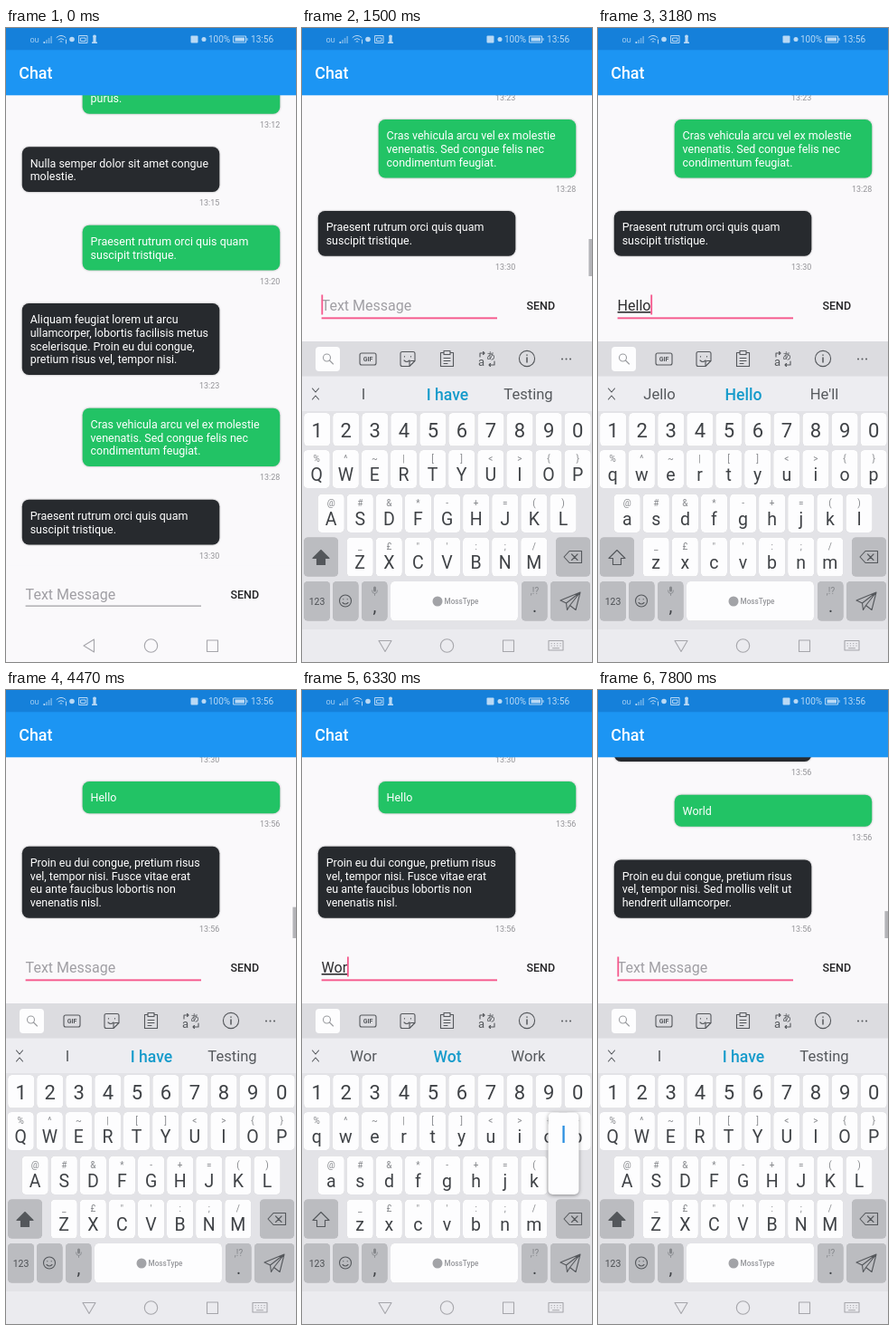
Recreate the animation shown at these times as an HTML page. Size 321 by 700 pixels, loop 8000 ms.

```html
<!DOCTYPE html>
<html lang="en">
<head>
<meta charset="utf-8">
<title>Chat</title>
<style>
html, body { margin: 0; width: 100%; height: 100%; overflow: hidden; background: #faf9fb; }
svg { display: block; width: 321px; height: 700px; font-family: Roboto, "Noto Sans", sans-serif; }
.line { fill: none; stroke: #54575b; stroke-width: 1.1; stroke-linecap: round; stroke-linejoin: round; }
.mid { text-anchor: middle; }
.bubble rect { filter: drop-shadow(0 .7px .9px #0005); }
.bubble text { font-size: 12.48px; fill: #fff; }
.bubble .time { font-size: 8.92px; fill: #929296; text-anchor: end; }
.key { fill: #fdfdfe; filter: drop-shadow(0 .6px .4px #0003); }
.special { fill: #bbbcc0; }
.letter { font-size: 19.5px; fill: #3f4246; }
.symbol { font-size: 10px; fill: #85878b; }
.status { fill: #b9d9f5; }
.status .line { stroke: #b9d9f5; stroke-width: 1; }
.nav .line { stroke: #a6a6ab; }
</style>
</head>
<body>
<script>
(() => {
const LOOP = 8000, PINK = '#f5588c';
const LIFT = 318.6;                       // how far the keyboard raises the input row
const LINE = 14.63, GAP = 36.6, VIEW = 199;
const FOCUS = 630, RESIZE = 840, HOLD = 70;
const SENDS = [3970, 7600];

const MESSAGES = [
  [1, '13:12', '', '', 'purus.'],
  [0, '13:15', 'Nulla semper dolor sit amet congue', 'molestie.'],
  [1, '13:20', 'Praesent rutrum orci quis quam', 'suscipit tristique.'],
  [0, '13:23', 'Aliquam feugiat lorem ut arcu', 'ullamcorper, lobortis facilisis metus',
    'scelerisque. Proin eu dui congue,', 'pretium risus vel, tempor nisi.'],
  [1, '13:28', 'Cras vehicula arcu vel ex molestie', 'venenatis. Sed congue felis nec', 'condimentum feugiat.'],
  [0, '13:30', 'Praesent rutrum orci quis quam', 'suscipit tristique.'],
  [1, '13:56', 'Hello'],
  [0, '13:56', 'Proin eu dui congue, pretium risus', 'vel, tempor nisi. Fusce vitae erat',
    'eu ante faucibus lobortis non', 'venenatis nisl.'],
  [1, '13:56', 'World'],
  [0, '13:56', 'Proin eu dui congue, pretium risus', 'vel, tempor nisi. Sed mollis velit ut', 'hendrerit ullamcorper.']
];

const PRESSES = [
  [1890, 'H'], [2400, 'e'], [2580, 'l'], [2730, 'l'], [2860, 'o'],
  [4920, 'W'], [5700, 'o'], [5960, 'r'], [6330, 'l'], [6780, 'd']
];

const GUESSES = {
  '': 'I,I have,Testing',
  H: 'He,Hi,How', He: "He's,He,Hey", Hel: 'Hel,Help,Held', Hell: "Hello,Hell,He'll", Hello: "Jello,Hello,He'll",
  W: 'We,What,Will', Wo: 'Wo,Would,Work', Wor: 'Wor,Wot,Work', Worl: 'Worl,World,Worlds', World: 'Worlds,World,Would'
};

const clamp = v => Math.max(0, Math.min(1, v));
const ramp = (t, a, b) => clamp((t - a) / (b - a));
const ease = p => 1 - (1 - p) ** 3;

function el(tag, attrs, parent, text) {
  const node = document.createElementNS('http://www.w3.org/2000/svg', tag);
  for (const k in attrs) node.setAttribute(k, attrs[k]);
  if (text !== undefined) node.textContent = text;
  if (parent) parent.append(node);
  return node;
}
const rect = (p, x, y, width, height, fill, rx = 0, more = {}) =>
  el('rect', { x, y, width, height, fill, rx, ...more }, p);
const label = (p, x, y, text, attrs = {}) => el('text', { x, y, ...attrs }, p, text);
const stroke = (p, d, attrs = {}) => el('path', { d, class: 'line', ...attrs }, p);
const ring = (p, cx, cy, r) => el('circle', { cx, cy, r, class: 'line' }, p);
const dot = (p, cx, cy, r, fill) => el('circle', { cx, cy, r, fill }, p);
const shift = (node, y) => node.setAttribute('transform', `translate(0 ${y})`);
const show = (node, on) => node.setAttribute('visibility', on ? 'visible' : 'hidden');

const svg = el('svg', { viewBox: '0 0 321 700' }, document.body);
rect(svg, 0, 0, 321, 700, '#faf9fb');

// Message list
const list = el('g', {}, svg);
const bubbles = [];
let nextY = 94.7 - 20.5 - 3 * LINE;
for (const [mine, time, ...lines] of MESSAGES) {
  const x = mine ? 84.7 : 17.8, y = nextY, h = 20.5 + LINE * lines.length;
  const g = el('g', { class: 'bubble' }, list);
  rect(g, x, y, 218.5, h, mine ? '#22c365' : '#272a2e', 7.5);
  lines.forEach((s, i) => label(g, x + 8.9, y + 22.3 + i * LINE, s));
  label(g, x + 218.5, y + h + 15.3, time, { class: 'time' });
  bubbles.push({ g, step: h + GAP });
  nextY += h + GAP;
}
const GROWTH = [bubbles[6].step + bubbles[7].step, bubbles[8].step + bubbles[9].step];

// Input row
const row = el('g', {}, svg);
rect(row, 0, 274.5, 321, 430, '#faf9fb');
const hint = label(row, 21.6, 312, 'Text Message', { 'font-size': 16.05, fill: '#a09fa4' });
const typed = label(row, 21.6, 312, '', { 'font-size': 16.05, fill: '#2c2c2e', 'text-decoration': 'underline' });
const rule = rect(row, 21.6, 319, 194.4, 1, '#8b8b8f');
const focusRule = rect(row, 21.6, 319.4, 194.4, 1.9, PINK);
const caret = rect(row, 21.4, 294.5, 1.8, 22, PINK);
label(row, 248.5, 311, 'SEND', { 'font-size': 12.48, 'font-weight': 500, fill: '#242426' });
const thumb = rect(svg, 317.4, 233, 3.6, 41, '#b4b4b8');

// Keyboard
const board = el('g', {}, svg);
rect(board, 0, 346, 321, 39, '#dcdce0');
rect(board, 0, 384.5, 321, 39, '#ededf1');
rect(board, 0, 423, 321, 242, '#e3e3e7');
rect(board, 0, 664, 321, 36, '#ebebef');

rect(board, 15, 352, 27, 27, '#fdfdfe', 4);
ring(board, 27.5, 364, 4).style.stroke = '#9a9ca0';
stroke(board, 'M30.5 367l4 4').style.stroke = '#9a9ca0';
stroke(board, 'M66 359h14a2 2 0 0 1 2 2v9a2 2 0 0 1-2 2h-14a2 2 0 0 1-2-2v-9a2 2 0 0 1 2-2z');
label(board, 73, 368.3, 'GIF', { class: 'mid', 'font-size': 7, 'font-weight': 700, fill: '#54575b' });
stroke(board, 'M111 357.5h12a2 2 0 0 1 2 2v8l-6 6h-8a2 2 0 0 1-2-2v-12a2 2 0 0 1 2-2zM125 367.5h-4a2 2 0 0 0-2 2v4M113 367q3 3 6 0M113.5 362.5v.4M120.5 362.5v.4');
stroke(board, 'M157 358.5h-3.5v15h14v-15h-3.5M157 356.5h7v4h-7zM157 364.5h7M157 367.5h7M157 370.5h4');
label(board, 195, 373, 'a', { 'font-size': 13, fill: '#54575b' });
label(board, 204, 366, 'あ', { 'font-size': 10, fill: '#54575b', 'font-family': '"Noto Sans CJK JP", "Noto Sans CJK", sans-serif' });
stroke(board, 'M197 363v-4h5m-1.5-1.5l1.5 1.5l-1.5 1.5M213 368v4h-6m1.5-1.5l-1.5 1.5l1.5 1.5');
ring(board, 249, 365, 8.6);
stroke(board, 'M249 364v5M249 361v.3', { style: 'stroke-width:1.5' });
for (const x of [288, 292.5, 297]) dot(board, x, 365.5, 1, '#54575b');

stroke(board, 'M11.5 398l3.5 4l3.5-4M11.5 410l3.5-4l3.5 4');
const guesses = [68, 161, 250.5].map((x, i) => label(board, x, i === 1 ? 410.8 : 410.3, '', {
  class: 'mid', 'font-size': i === 1 ? 17.6 : 16.6, fill: i === 1 ? '#169bcb' : '#56595d', 'font-weight': i === 1 ? 500 : 400
}));

const keyAt = {}, letters = [];
const key = (x, y, w, h, special) =>
  el('rect', { x, y, width: w, height: h, rx: 4.5, class: special ? 'key special' : 'key' }, board);
const ROWS = [
  ['QWERTYUIOP', '%^~|[]<>{}', 16.2, 466, 42],
  ['ASDFGHJKL', '@#&*-+=()', 32.2, 514.5, 42.5],
  ['ZXCVBNM', '_£"\':;/', 64.2, 562.5, 43]
];
[...'1234567890'].forEach((c, i) => {
  const x = 16.7 + i * 32.05;
  key(x - 14.6, 425, 29.2, 36.5);
  label(board, x, 452.3, c, { class: 'mid letter', style: 'font-size:22px' });
});
for (const [chars, symbols, x0, y, h] of ROWS) {
  [...chars].forEach((c, i) => {
    const x = x0 + i * 32.1;
    key(x - 14.6, y, 29.2, h);
    label(board, x, y + 13, symbols[i], { class: 'mid symbol' });
    letters.push(label(board, x, y + 34.3, c, { class: 'mid letter' }));
    keyAt[c] = { x, y, h };
  });
}
key(2, 562.5, 38, 43, true);
const shiftIcon = stroke(board, 'M21 576.5l9 9h-4.5v7h-9v-7h-4.5z');
key(281, 562.5, 38, 43, true);
stroke(board, 'M296 577.5h13.5v13h-13.5l-6-6.5zM298.5 581l6.5 6.5M305 581l-6.5 6.5');
for (const [x, w] of [[2, 29], [34, 28.5], [66, 28.5], [243, 28.5], [275, 44]]) key(x, 611, w, 43.5, true);
key(98, 611, 141, 43.5);
label(board, 16.5, 637, '123', { class: 'mid', 'font-size': 10.5, fill: '#4c4f53' });
ring(board, 48, 632.5, 6.5);
stroke(board, 'M45 634.5q3 3 6 0M45.8 630.5v.3M50.2 630.5v.3');
rect(board, 79, 616.5, 3, 6, '#85878b', 1.5);
stroke(board, 'M77.5 621q0 3.5 3 3.5t3-3.5M80.5 624.5v2', { style: 'stroke:#85878b;stroke-width:.8' });
label(board, 80.5, 644.5, ',', { class: 'mid letter' });
label(board, 257.5, 625, ',!?', { class: 'mid symbol' });
label(board, 257.5, 644.5, '.', { class: 'mid letter' });
dot(board, 150, 633, 5.5, '#a2a3a7');
label(board, 157.5, 636, 'MossType', { 'font-size': 8.2, 'font-weight': 500, fill: '#97989c' });
stroke(board, 'M286 632l22-9l-5 19.5l-6.5-5l-3 5l-1-7.5zM292.5 635l15.5-12l-11.5 14.5');

const popup = el('g', {}, svg);
const popBox = rect(popup, 0, 0, 34, 90, '#fdfdfe', 5, { style: 'filter:drop-shadow(0 1px 2px #0006)' });
const popText = label(popup, 0, 0, '', { class: 'mid', 'font-size': 25, fill: '#2a8fe0' });

// Navigation bar
const nav = el('g', { class: 'nav' }, svg);
const back = stroke(nav, '');
ring(nav, 160.5, 682, 7.2);
stroke(nav, 'M222.5 676h12v12.5h-12z');
const hideKey = stroke(nav, 'M273 676.5h16v10.5h-16zM276 679.5h.3m3 0h.3m3 0h.3m3 0h.3M276 682h.3m3 0h.3m3 0h.3m3 0h.3M277.5 684.7h7');

// Header and status bar
const PALE = '#b9d9f5';
rect(svg, 0, 24, 321, 50.3, '#1c95f3');
rect(svg, 0, 0, 321, 24.3, '#1580da');
label(svg, 14.3, 56, 'Chat', { 'font-size': 17.83, 'font-weight': 500, fill: '#fff' });
const bar = el('g', { class: 'status' }, svg);
label(bar, 26.5, 15.5, 'OU', { 'font-size': 7.5 });
for (let i = 0; i < 4; i++) rect(bar, 41.5 + i * 2.6, 15 - i * 2, 1.7, 2 + i * 2, PALE, 0, { opacity: i < 1 ? 1 : .5 });
stroke(bar, 'M56 10.5q5-4.5 10 0M58 12.8q3-2.6 6 0M60 15q1-.8 2 0M66.5 13v4');
dot(bar, 73, 12.5, 2.8, PALE);
stroke(bar, 'M81 8.5h9v8h-9zM83 11h5v3.5h-5z');
dot(bar, 98, 9.5, 2, PALE);
rect(bar, 96.4, 11, 3.2, 5, PALE);
rect(bar, 95, 15.5, 6, 1.5, PALE);
rect(bar, 204.5, 8.5, 8, 8, PALE, 1);
dot(bar, 219, 12.5, 2.5, PALE);
label(bar, 224, 16, '100%', { 'font-size': 10 });
stroke(bar, 'M252 9h13.5v7h-13.5zM267 11.5v2');
rect(bar, 253.5, 10.5, 10.5, 4, PALE);
label(bar, 271, 16, '13:56', { 'font-size': 10.1 });

function textAt(t) {
  const from = SENDS.filter(s => s <= t).pop() || 0;
  return PRESSES.filter(([p]) => p + HOLD <= t && p > from).map(p => p[1]).join('');
}

function caretOn(t) {
  const resets = [500, ...PRESSES.map(p => p[0] + HOLD), ...SENDS].filter(r => r <= t);
  return t >= FOCUS && Math.floor((t - Math.max(...resets)) / 500) % 2 === 0;
}

function drawList(t) {
  const sent = SENDS.filter(s => s <= t).length;
  const extra = GROWTH.slice(0, sent).reduce((a, b) => a + b, 0);
  const scroll = LIFT * ease(ramp(t, 930, 1200))
    + GROWTH[0] * ease(ramp(t, SENDS[0], 4220))
    + GROWTH[1] * ease(ramp(t, SENDS[1], 7790));
  bubbles.forEach(({ g }, i) => show(g, i < 6 + 2 * sent));
  shift(list, -scroll);

  const length = 966 + extra, size = VIEW * VIEW / length;
  thumb.setAttribute('height', size);
  thumb.setAttribute('y', 274 - size - VIEW * (LIFT + extra - scroll) / length);
  thumb.setAttribute('opacity', ramp(t, 930, 990) - ramp(t, 1620, 1860)
    + ramp(t, 3970, 4030) - ramp(t, 4920, 5100) + ramp(t, 7600, 7660));
}

function drawInput(t, text) {
  shift(row, t < RESIZE ? LIFT : 0);
  typed.textContent = text;
  show(hint, !text);
  show(rule, t < FOCUS);
  show(focusRule, t >= FOCUS);
  show(caret, caretOn(t));
  caret.setAttribute('x', 21.4 + (text ? typed.getComputedTextLength() : 0));
}

function drawBoard(t, text) {
  const rise = ramp(t, 810, 990);
  board.setAttribute('opacity', rise);
  shift(board, 68 * (1 - rise));
  letters.forEach(n => {
    const c = n.textContent;
    n.textContent = text ? c.toLowerCase() : c.toUpperCase();
  });
  shiftIcon.style.fill = text ? 'none' : '#54575b';
  GUESSES[text].split(',').forEach((s, i) => { guesses[i].textContent = s; });

  const press = PRESSES.find(([p]) => t >= p && t < p + HOLD);
  show(popup, press);
  if (press) {
    const { x, y, h } = keyAt[press[1].toUpperCase()];
    popBox.setAttribute('x', x - 16.5);
    popBox.setAttribute('y', y - 48);
    popBox.setAttribute('height', h + 48);
    popText.setAttribute('x', x + .5);
    popText.setAttribute('y', y - 14.5);
    popText.textContent = press[1];
  }

  back.setAttribute('d', rise ? 'M85 676.5h14l-7 12z' : 'M86 682l11.5-7v14z');
  show(hideKey, rise);
}

function tick() {
  const t = performance.now() % LOOP, text = textAt(t);
  drawList(t);
  drawInput(t, text);
  drawBoard(t, text);
  requestAnimationFrame(tick);
}
tick();
})();
</script>
</body>
</html>
```
